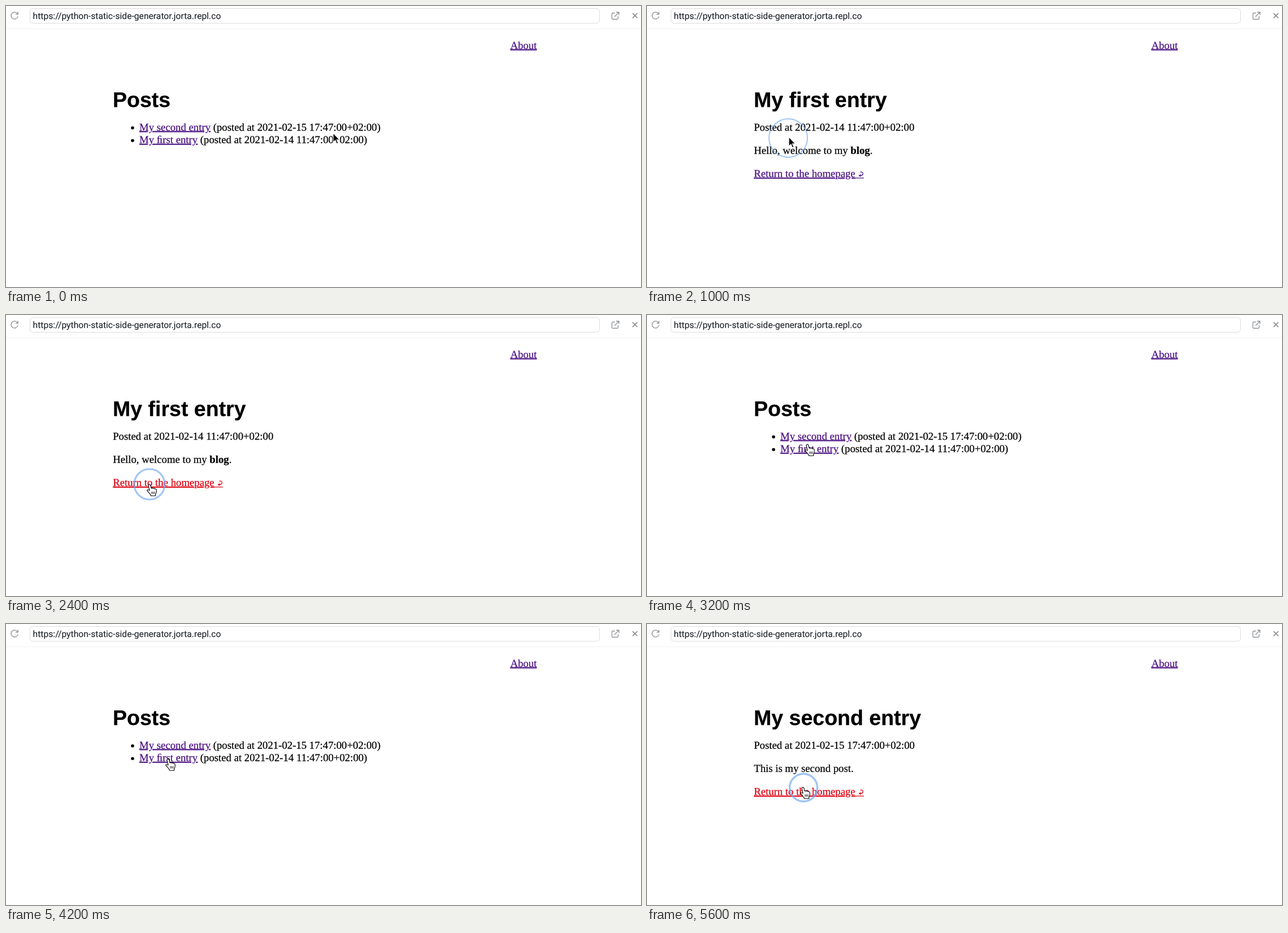
An HTML page for the animation above (5.8 s loop, 1124 by 498 pixels).

```html
<!DOCTYPE html>
<html lang="en">
<head>
<meta charset="utf-8">
<title>Blog demo</title>
<style>
  html, body { margin: 0; width: 100%; height: 100%; overflow: hidden; background: #fff; }
  svg { display: block; }
  text {
    font: 18.74px "Liberation Serif", "Times New Roman", serif;
    text-rendering: geometricPrecision;
  }
  text, tspan { fill: currentColor; stroke: currentColor; stroke-width: .25; }
  .title { font: bold 37.5px "Liberation Sans", Arial, sans-serif; }
  .url { font: 15.68px Roboto, sans-serif; color: #1c2026; stroke-width: .1; }
  .link { color: #4b1083; text-decoration: underline 1px; text-underline-offset: 1.2px; }
  .active, .active .link { color: #e00010; }
  .bold { font-weight: bold; }
  #back { color: #4b1083; }
  #back.active { color: #e00010; }
  #back path { fill: none; stroke: currentColor; stroke-width: 1.2; }
  .icon { fill: none; stroke: #8b8f94; stroke-width: 1.3; stroke-linecap: round; stroke-linejoin: round; }
  #ring { fill: none; stroke: #71a7f0; stroke-opacity: .66; }
</style>
</head>
<body>
<svg width="1124" height="498" viewBox="0 0 1124 498">
  <path d="M0 40.5H1124" stroke="#f1f1f2"/>
  <rect x="42.5" y="4.5" width="1008" height="26" rx="5" fill="#fff" stroke="#dcdcde"/>
  <text class="url" x="47.6" y="23">https://python-static-side-generator.jorta.repl.co</text>
  <g class="icon">
    <path d="M20.3 13.7A6.1 6.1 0 1 0 21 18.6M21.2 10.8V14.6H17.4"/>
    <path d="M1077.5 12.5H1074Q1072.5 12.5 1072.5 14V22Q1072.5 23.5 1074 23.5H1082Q1083.5 23.5 1083.5 22V18.5M1080.5 11H1085V15.5M1085 11L1077.5 18.5"/>
    <path d="M1109.5 13.3L1117 20.8M1117 13.3L1109.5 20.8" stroke-width="1.7"/>
  </g>
  <text x="892.7" y="75.7"><tspan class="link">About</tspan></text>

  <g id="home">
    <text class="title" x="189.1" y="178.7">Posts</text>
    <circle cx="224" cy="216" r="2.8"/>
    <circle cx="224" cy="238.5" r="2.8"/>
    <text x="236.1" y="220.7"><tspan class="link" id="toSecond">My second entry</tspan> (posted at 2021-02-15 17:47:00+02:00)</text>
    <text x="236.1" y="243.1"><tspan class="link" id="toFirst">My &#xFB01;rst entry</tspan> (posted at 2021-02-14 11:47:00+02:00)</text>
  </g>
  <g id="first">
    <text class="title" x="189.1" y="178.7">My first entry</text>
    <text x="189.2" y="220.7">Posted at 2021-02-14 11:47:00+02:00</text>
    <text x="189.2" y="261.9">Hello, welcome to my <tspan class="bold">blog</tspan>.</text>
  </g>
  <g id="second">
    <text class="title" x="189.1" y="178.7">My second entry</text>
    <text x="189.2" y="220.7">Posted at 2021-02-15 17:47:00+02:00</text>
    <text x="189.2" y="261.9">This is my second post.</text>
  </g>
  <g id="back">
    <text x="189.2" y="303.1"><tspan class="link">Return to the homepage</tspan></text>
    <path d="M377.5 294.4C381 293.4 383.4 296 382 298.6C381 300.4 379 300.8 376 300.6M378.2 298.4L375.6 300.6L378.4 302.2M368 304.9H384"/>
  </g>

  <circle id="ring"/>
  <g id="cursor">
    <path id="arrow" d="M0 0V16.6L3.8 13L6.4 19.2L9 18.1L6.4 12H11.6Z" stroke="#fff" stroke-width="1.2"/>
    <g id="hand" stroke="#111" stroke-width="1.2" stroke-linejoin="round">
      <path fill="#fff" d="M-2 1Q-1.6 -.8 .3 -.6Q1.6 -.2 1.9 1.3L3 6Q4.5 4.9 6 6.3Q7.6 5.4 8.9 7Q11 6.3 12 8.2Q12.8 11 11.8 14L10.6 17V19.5H2.6Q2 17 -.2 14.8L-3.6 11Q-4.8 9.4 -3.4 8.8Q-2 8.4 0 10.2Z"/>
      <path d="M4 12V16M6.4 12V16M8.8 12V16" stroke-width="1"/>
    </g>
    <g id="beam" fill="none">
      <path d="M-4 -9Q0 -9 0 -6.5Q0 -9 4 -9M0 -6.5V6.5M-4 9Q0 9 0 6.5Q0 9 4 9M-2 3H2" stroke="#fff" stroke-width="3"/>
      <path d="M-4 -9Q0 -9 0 -6.5Q0 -9 4 -9M0 -6.5V6.5M-4 9Q0 9 0 6.5Q0 9 4 9M-2 3H2" stroke="#222" stroke-width="1.3"/>
    </g>
  </g>
</svg>
<script>
const LOOP = 5800, STEP = 200, PRESS = 200, RING_LIFE = 400;

// time, x, y, cursor shape from then on
const path = [
  [0, 579, 225, 'arrow'],
  [600, 268, 235, 'hand'],
  [800, 250, 233, 'hand'],
  [1000, 251, 232, 'arrow'],
  [1400, 251, 246, 'beam'],
  [1600, 252, 272, 'arrow'],
  [1800, 254, 293, 'hand'],
  [2400, 254, 301, 'hand'],
  [2600, 255, 299, 'arrow'],
  [3200, 284, 230, 'hand'],
  [4200, 287, 240, 'hand'],
  [4400, 286, 220, 'hand'],
  [4600, 284, 236, 'arrow'],
  [4800, 282, 260, 'beam'],
  [5200, 279, 286, 'hand'],
  [5600, 276, 290, 'hand'],
  [LOOP, 276, 290, 'hand']
];

const clicks = [
  { start: 723, x: 250, y: 234, link: 'toFirst', page: 'first' },
  { start: 2231, x: 254, y: 300, link: 'back', page: 'home' },
  { start: 4231, x: 286, y: 220, link: 'toSecond', page: 'second' },
  { start: 5469, x: 277, y: 290, link: 'back', page: 'home' }
];

const el = id => document.getElementById(id);
const show = (id, on) => { el(id).style.display = on ? '' : 'none'; };

function drawCursor(t) {
  const i = path.findIndex(p => p[0] > t) - 1;
  const [t0, x0, y0, shape] = path[i];
  const [t1, x1, y1] = path[i + 1];
  const k = (t - t0) / (t1 - t0);
  const e = k * k * (3 - 2 * k);
  el('cursor').setAttribute('transform', `translate(${x0 + (x1 - x0) * e} ${y0 + (y1 - y0) * e})`);
  for (const id of ['arrow', 'hand', 'beam']) show(id, id === shape);
}

function drawRing(click, age) {
  const ring = el('ring');
  show('ring', click);
  if (!click) return;
  ring.setAttribute('cx', click.x);
  ring.setAttribute('cy', click.y);
  ring.setAttribute('r', 16 + age * 0.065);
  ring.setAttribute('stroke-width', 5 - age * 0.011);
}

function draw(t) {
  const loaded = clicks.filter(c => t > c.start + PRESS).pop();
  const page = loaded ? loaded.page : 'home';
  for (const id of ['home', 'first', 'second']) show(id, id === page);
  show('back', page !== 'home');

  const click = clicks.find(c => t >= c.start && t < c.start + RING_LIFE);
  const age = click ? t - click.start : 0;
  for (const id of ['toFirst', 'toSecond', 'back'])
    el(id).classList.toggle('active', !!click && click.link === id && age < PRESS);

  drawRing(click, age);
  drawCursor(t);
}

const begin = performance.now();
function tick() {
  const t = (performance.now() - begin) % LOOP;
  draw(Math.floor(t / STEP) * STEP);
  requestAnimationFrame(tick);
}
tick();
</script>
</body>
</html>
```
